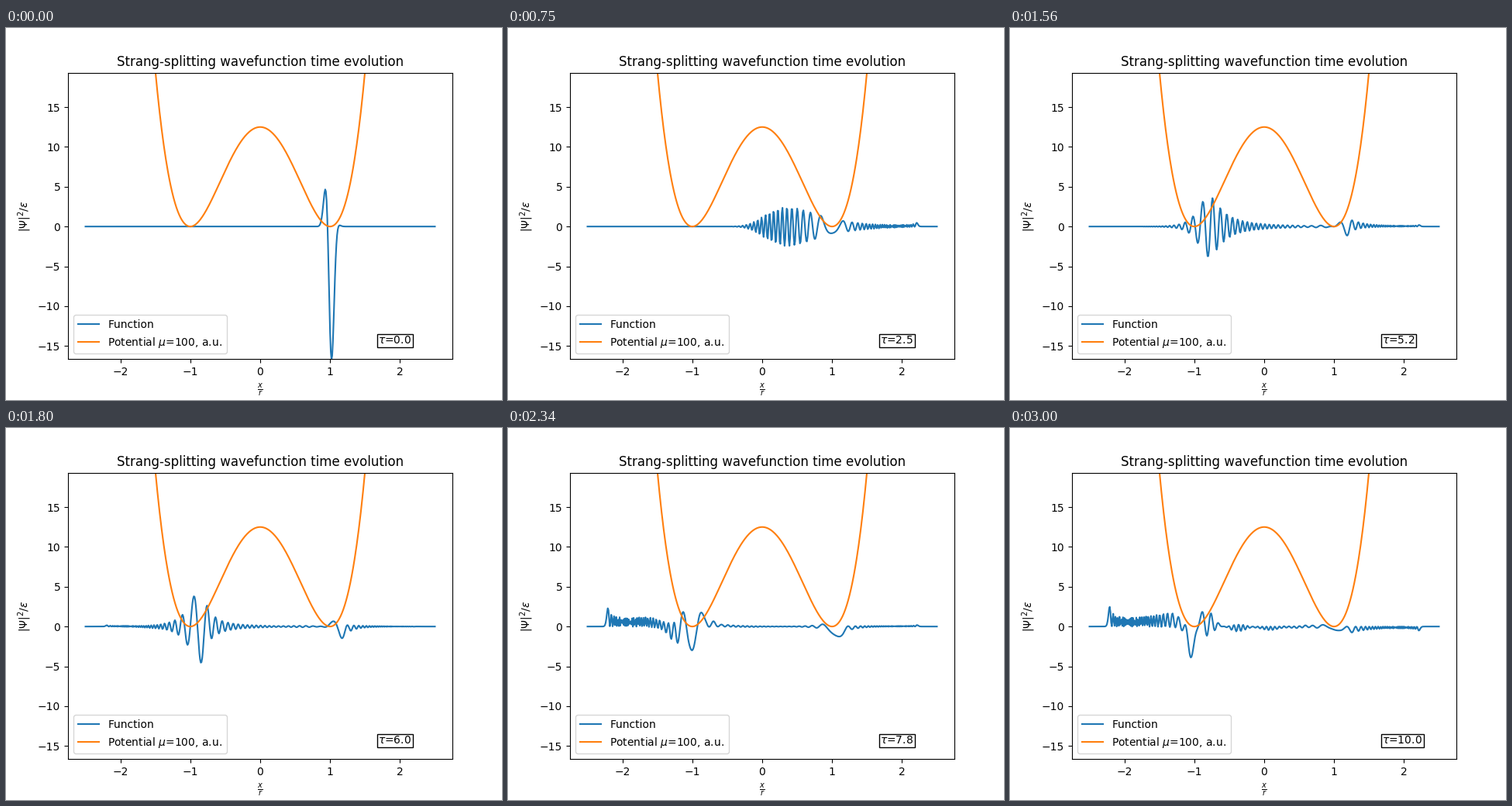
A matplotlib script for the animation above (3030 ms loop, 640 px wide and 480 px high).

```python
import numpy as np
import matplotlib.pyplot as plt
from matplotlib.animation import FuncAnimation

plt.rcParams["text.kerning_factor"] = 6

FRAMES, INTERVAL = 101, 30
EPS, MU, N = 0.1, 100, 501

x = np.linspace(-2.5, 2.5, N)
dx = x[1] - x[0]
V = MU / 8 * (x**2 - 1) ** 2

# Lattice Hamiltonian: positive hopping between neighbours plus the double well
hop = EPS / (2 * dx**2)
H = np.diag(2 * hop + V / EPS) + hop * (np.eye(N, k=1) + np.eye(N, k=-1))
E, U = np.linalg.eigh(H)

psi0 = np.sqrt(2 / EPS) * np.exp(-((x - 1) / EPS) ** 2 + 1j * (x + 1) / EPS)
coef = U.T @ psi0


def profile(tau):
    psi = U @ (np.exp(-1j * E * tau / np.sqrt(MU)) * coef)
    return (psi**2).real


fig, ax = plt.subplots(figsize=(6.4, 4.8), dpi=100)
wave, = ax.plot(x, profile(0), label="Function")
ax.plot(x, V, label=rf"Potential $\mu$={MU}, a.u.")
ax.set_xlim(-2.75, 2.75)
ax.set_ylim(-16.65, 19.33)
ax.set_title("Strang-splitting wavefunction time evolution")
ax.set_xlabel(r"$\frac{x}{r}$")
ax.set_ylabel(r"$|\Psi|^2/\varepsilon$")
ax.legend(loc="lower left")
clock = ax.text(1.69, -14.7, "", bbox=dict(facecolor="white", pad=1))


def update(i):
    tau = i / 10
    wave.set_ydata(profile(tau))
    clock.set_text(rf"$\tau$={tau:.1f}")
    return wave, clock


anim = FuncAnimation(fig, update, frames=FRAMES, interval=INTERVAL,
                     repeat=True, repeat_delay=0)
plt.show()
```
